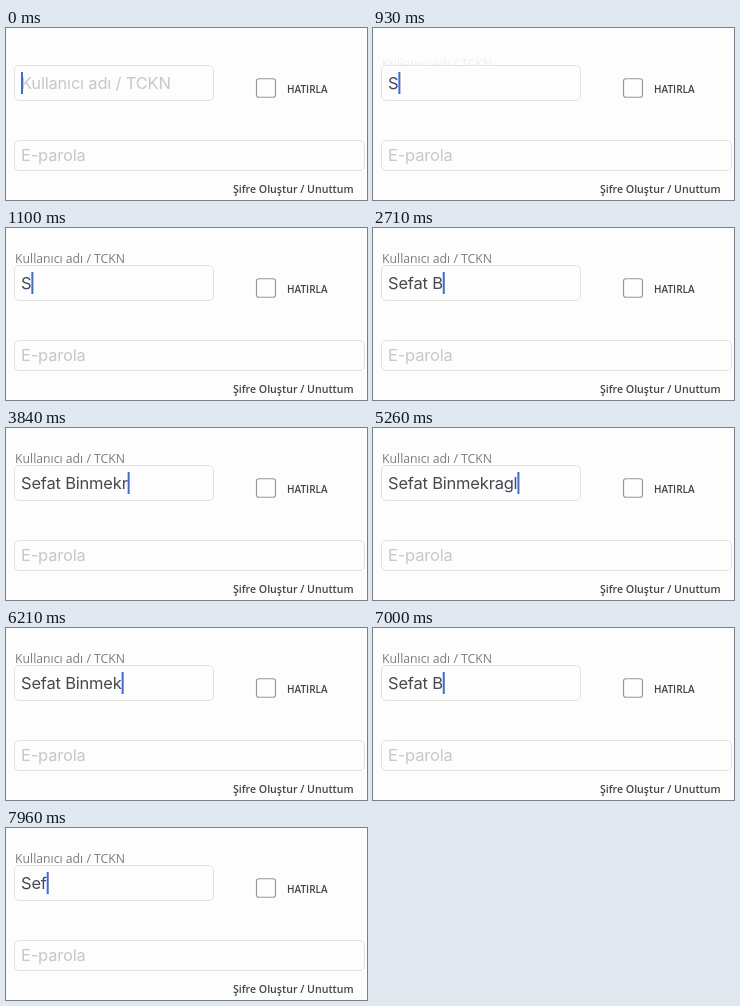
Write an HTML page that moves like this. It is 361 by 172 pixels and loops after 8 s.

```html
<!DOCTYPE html>
<html lang="tr">
<head>
<meta charset="utf-8">
<title>Giriş formu</title>
<style>
  html, body { margin: 0; width: 100%; height: 100%; overflow: hidden; background: #fdfdfd; }
  svg { display: block; }
  text { white-space: pre; }
  .field { fill: #fdfdfd; stroke: #e2e2e2; }
  .input { font: 16.5px Inter, sans-serif; letter-spacing: -0.2px; fill: #45494f; }
  .hint { fill: #c8c8ca; }
  .small { font: 600 10.6px "Open Sans", "Noto Sans", sans-serif; fill: #40454d; }
  #label { font-size: 12.25px; font-weight: 400; fill: #7c7c80; }
</style>
</head>
<body>
<svg width="361" height="172" viewBox="0 0 361 172">
  <text id="label" class="small" x="9" y="35">Kullanıcı adı / TCKN</text>
  <rect class="field" x="8.5" y="37.5" width="199" height="35" rx="4.5"/>
  <text id="hint" class="input hint" x="15" y="61">Kullanıcı adı / TCKN</text>
  <text id="name" class="input" x="15" y="61"></text>
  <rect id="caret" y="44" width="2" height="22" fill="#3f6bd6"/>

  <rect x="250.5" y="50.75" width="19" height="18.5" rx="2.5" fill="#fdfdfd" stroke="#999" stroke-width="1.2"/>
  <text class="small" x="281" y="65" style="font-size:10px">HATIRLA</text>

  <rect class="field" x="8.5" y="112.5" width="350" height="30" rx="4.5"/>
  <text class="input hint" x="15" y="133">E-parola</text>
  <text class="small" x="227" y="165">Şifre Oluştur / Unuttum</text>
</svg>
<script>
const LOOP = 8000;
const FULL_NAME = "Sefat Binmekraglu";
const typed = [
  930, 1310, 1490, 1660, 1840, 2320,
  2710, 3130, 3270, 3410, 3560, 3700, 3840, 4370, 4530, 4690, 4850
];
const deleted = [
  5260, 5610, 5820, 6020, 6210, 6360, 6510, 6650,
  6830, 7000, 7360, 7560, 7760, 7960
];

const [label, hint, name, caret] =
  ["label", "hint", "name", "caret"].map(id => document.getElementById(id));

const ramp = (t, from, to) => Math.min(1, Math.max(0, (t - from) / (to - from)));
const countBy = (times, t) => times.filter(time => time <= t).length;

function draw(t) {
  const length = countBy(typed, t) - countBy(deleted, t);
  name.textContent = FULL_NAME.slice(0, length);
  hint.style.visibility = length ? "hidden" : "visible";

  // The floating label rises out of the field as it fades in.
  const shown = ramp(t, 910, 1100);
  label.setAttribute("opacity", shown);
  label.setAttribute("y", 35 + 6 * (1 - shown) ** 2);

  // The caret blinks once before typing starts.
  caret.setAttribute("x", 15 + (length ? name.getComputedTextLength() : 0));
  caret.setAttribute("opacity", 1 - ramp(t, 50, 220) + ramp(t, 490, 610));
}

const start = performance.now();
function tick() {
  draw((performance.now() - start) % LOOP);
  requestAnimationFrame(tick);
}
tick();
</script>
</body>
</html>
```
